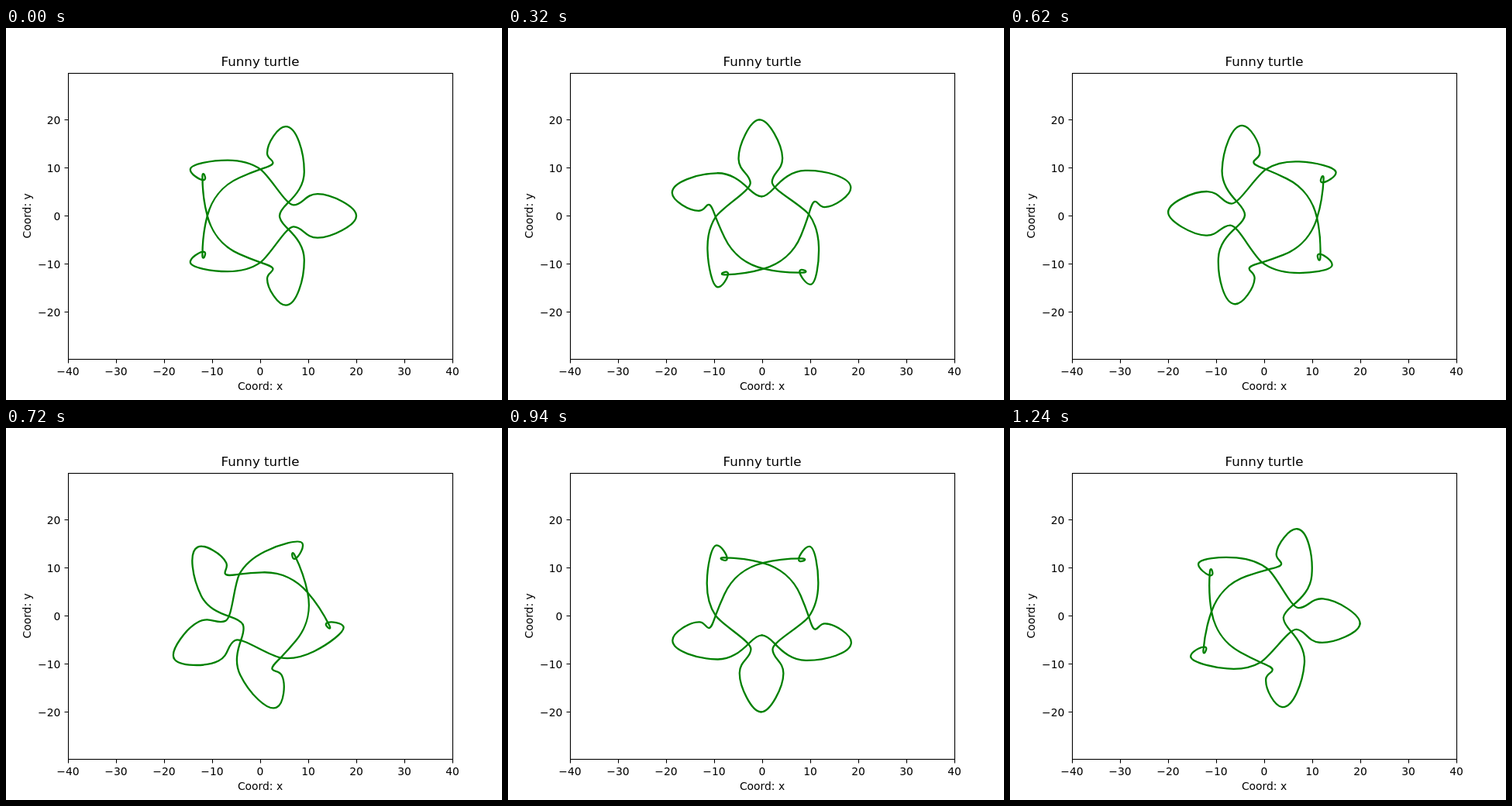
An HTML page that plays this animation: 640x480 px, repeating every 1260 ms.

```html
<!DOCTYPE html>
<html lang="en">
<head>
<meta charset="utf-8">
<title>Funny turtle</title>
<style>
  html, body { margin: 0; width: 100%; height: 100%; overflow: hidden; background: #fff; }
  svg { display: block; width: 640px; height: 480px; }
  text { font: 13.89px "DejaVu Sans", sans-serif; text-anchor: middle; }
  #title { font-size: 16.67px; }
  #yTicks text { text-anchor: end; }
  .axes { fill: none; stroke: #000; stroke-width: 1.1; }
  #turtle { fill: none; stroke: #008000; stroke-width: 2.3; stroke-linejoin: round; stroke-linecap: round; }
</style>
</head>
<body>
<svg viewBox="0 0 640 480">
  <defs>
    <path id="half" d="M124 0
      C124 -12 92 -28.3 74 -28.3 C58 -28.3 55 -14 43 -14
      C33 -14 15 -48 .5 -60 C-13 -69.5 -30 -71.8 -42 -71.8
      C-62 -71.8 -90.2 -67 -90.2 -59.7 C-90.2 -54 -79 -47 -74 -46.2
      C-70.5 -45.7 -70.5 -49 -71.5 -51.5 C-72.5 -55 -74.5 -55.5 -74.6 -51
      C-74.5 -35 -72 -14 -68.2 0 C-63 20 -50 39 -27 49.2
      C-18 53.2 -9 56.8 0 60 C8 62.8 16.5 65 16.5 68.7
      C16.5 72.5 9 74 9 81 C9 94 23 115.3 33 115.3
      C47 115.3 56.8 82 56.8 57 C56.8 40 47 27.5 35 16
      C28.5 9.5 25 5 25 0"/>
  </defs>
  <rect class="axes" x="80.5" y="58.5" width="496" height="369"/>
  <path class="axes" id="ticks"/>
  <g id="xTicks"></g>
  <g id="yTicks"></g>
  <text id="title" x="328" y="49.3">Funny turtle</text>
  <text x="328" y="467">Coord: x</text>
  <text transform="translate(31.8 242.4) rotate(-90)">Coord: y</text>
  <g id="turtle">
    <use href="#half"/>
    <use href="#half" transform="scale(1 -1)"/>
  </g>
</svg>
<script>
  const FRAME_MS = 20, FRAMES = 63, STEP = 0.1;
  const byId = id => document.getElementById(id);

  function addLabel(group, value, x, y) {
    const label = document.createElementNS("http://www.w3.org/2000/svg", "text");
    label.setAttribute("x", x);
    label.setAttribute("y", y);
    label.textContent = String(value).replace("-", "\u2212");
    byId(group).append(label);
  }

  let ticks = "";
  for (let v = -40; v <= 40; v += 10) {
    const x = 328 + v * 6.2;
    ticks += `M${x + 0.5} 428v4.5`;
    addLabel("xTicks", v, x, 447.6);
  }
  for (let v = -20; v <= 20; v += 10) {
    const y = 242.5 - v * 6.2;
    ticks += `M80 ${y}h-4.5`;
    addLabel("yTicks", v, 70.3, y + 5.2);
  }
  byId("ticks").setAttribute("d", ticks);

  function draw(now) {
    const angle = Math.floor(now / FRAME_MS) % FRAMES * STEP;
    byId("turtle").setAttribute("transform",
      `translate(328 242.4) rotate(${-angle * 180 / Math.PI})`);
    requestAnimationFrame(draw);
  }
  draw(performance.now());
</script>
</body>
</html>
```
